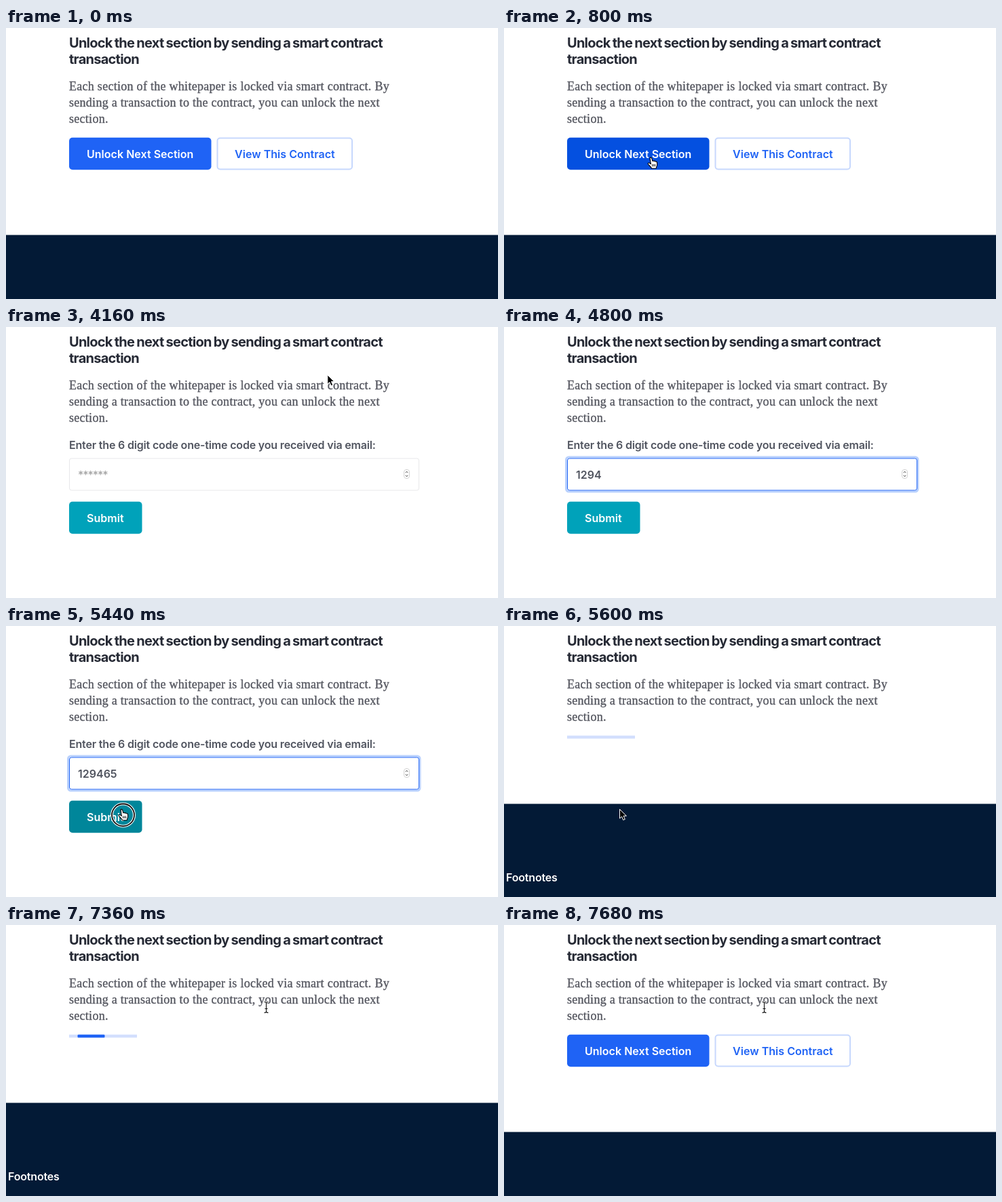
An HTML page for the animation above (8000 ms loop, 725 by 400 pixels).

```html
<!DOCTYPE html>
<html lang="en">
<head>
<meta charset="utf-8">
<title>Unlock section</title>
<style>
  html, body { margin: 0; width: 100%; height: 100%; overflow: hidden; background: #fff; }
  svg { display: block; width: 100%; height: 100%; }
  text { font: 600 16px Inter, sans-serif; letter-spacing: -.011em; white-space: pre; }
  .title { font-size: 20px; font-weight: 700; letter-spacing: -.75px; word-spacing: -.9px; fill: #262a35; }
  .copy { font: 18px "Liberation Serif", serif; letter-spacing: .28px; fill: #54565f; stroke: #54565f; stroke-width: .35; }
  .label { fill: #50545f; }
  .button { letter-spacing: .03px; fill: #fff; }
  .typed { letter-spacing: 0; fill: #50545f; }
  .empty { font-weight: 500; letter-spacing: -1.1px; fill: #a3a3a3; }
</style>
</head>
<body>
<svg viewBox="0 0 725 400" preserveAspectRatio="xMinYMin meet">
  <defs><clipPath id="track"><rect x="93" y="161.5" width="100" height="5"/></clipPath></defs>
  <rect width="725" height="400" fill="#fff"/>
  <text class="title" x="93" y="29">Unlock the next section by sending a smart contract</text>
  <text class="title" x="93" y="53">transaction</text>
  <text class="copy" x="93" y="92">Each section of the whitepaper is locked via smart contract. By</text>
  <text class="copy" x="93" y="116">sending a transaction to the contract, you can unlock the next</text>
  <text class="copy" x="93" y="140">section.</text>

  <g id="footer">
    <rect width="725" height="400" fill="#031a36"/>
    <text x="3" y="114" fill="#fff">Footnotes</text>
  </g>

  <g id="actions">
    <rect id="unlock" x="93" y="161.7" width="209.5" height="47.6" rx="5"/>
    <text class="button" x="119" y="191.5">Unlock Next Section</text>
    <rect x="311.5" y="162.5" width="198.5" height="46" rx="4" fill="#fff" stroke="#c7d8fd" stroke-width="2"/>
    <text class="button" x="337" y="191.5" style="fill:#1f63f5">View This Contract</text>
  </g>

  <g id="form">
    <text class="label" x="93" y="179.5">Enter the 6 digit code one-time code you received via email:</text>
    <rect id="glow" x="91.5" y="192" width="518.5" height="51" rx="4" fill="none" stroke="#b9d1fd" stroke-width="3"/>
    <rect id="field" x="93.5" y="194" width="515" height="47" rx="3" fill="#fff"/>
    <text id="code" x="106" y="223.5"></text>
    <rect x="586.5" y="210.5" width="8" height="13" rx="3.5" fill="#fff" stroke="#d2d2d2"/>
    <path d="M588.7 215.2l1.8-2 1.8 2M588.7 218.8l1.8 2 1.8-2" fill="none" stroke="#444"/>
    <rect id="submit" x="93" y="257.7" width="107.5" height="47.6" rx="5"/>
    <text class="button" x="119" y="287.5">Submit</text>
  </g>

  <g id="loader" clip-path="url(#track)">
    <rect x="93" y="161.5" width="100" height="5" fill="#d3dffd"/>
    <rect id="bar" y="161.5" width="40" height="5" rx="1.5" fill="#1f63f5"/>
  </g>

  <g id="pointer">
    <g id="ring" fill="none">
      <circle cx="2.5" cy="8.5" r="16.5" stroke="#fff" stroke-width="4"/>
      <circle cx="2.5" cy="8.5" r="16.5" stroke="#111" stroke-width="1.8"/>
    </g>
    <path id="arrow" d="M.5 .5V14l3.1-2.8 2.1 5.2 2.6-1.1-2.2-5h4.3z" fill="#000" stroke="#fff"/>
    <g id="hand">
      <path d="M-1 1.2C-.6-.3 1.3-.2 1.7 1.3L2.8 5.4C3.5 4.7 4.8 4.8 5.2 5.7 6 5.1 7.2 5.4 7.5 6.3 8.6 5.9 9.6 6.7 9.6 8V11C9.6 12.6 8.5 13.6 8.2 16.3H1.6C.8 14.2-1.2 12.6-3.5 10.2-4.7 8.7-3 7.4-1.5 8.5L.4 9.8z" fill="#fff" stroke="#000" stroke-width="1.1" stroke-linejoin="round"/>
      <path d="M2.6 10v3.4M4.6 10v3.4M6.6 10v3.4" stroke="#000" stroke-width=".9"/>
    </g>
    <g id="beam" fill="none">
      <path d="M-3-8Q0-8 0-6Q0-8 3-8M0-6V6M-3 8Q0 8 0 6Q0 8 3 8M-2 2H2" stroke="#fff" stroke-width="2.4"/>
      <path d="M-3-8Q0-8 0-6Q0-8 3-8M0-6V6M-3 8Q0 8 0 6Q0 8 3 8M-2 2H2" stroke="#111" stroke-width="1.1"/>
    </g>
  </g>
</svg>
<script>
const LOOP = 8000, STEP = 160;
const $ = id => document.getElementById(id);
const show = (id, on) => $(id).style.display = on ? '' : 'none';
const fill = (id, color) => $(id).setAttribute('fill', color);
const within = (t, from, to) => t >= from && t < to;

// Pointer stops: time, x, y, shape; an empty shape hides it.
const stops = [
  [0, 300, 390, ''],
  [160, 300, 352, 'arrow'],
  [480, 244, 236, 'arrow'],
  [640, 221, 202, 'hand'],
  [800, 216, 191, 'hand'],
  [960, 216, 191, 'hand'],
  [1120, 276, 169, 'arrow'],
  [1280, 276, 169, ''],
  [4160, 473.3, 70.3, 'arrow'],
  [4320, 430, 150, 'arrow'],
  [4480, 396, 216, 'beam'],
  [4640, 396, 216, ''],
  [5120, 182, 276, 'hand'],
  [5280, 170, 271, 'hand'],
  [5600, 170, 270, 'arrow'],
  [6560, 170, 270, 'arrow'],
  [7200, 350, 142, 'beam'],
  [7360, 383.5, 121.5, 'beam'],
  [LOOP, 383.5, 121.5, '']
];

function movePointer(t) {
  const i = stops.findIndex(s => s[0] > t);
  const [t0, x0, y0, shape] = stops[i - 1], [t1, x1, y1] = stops[i];
  const k = (t - t0) / (t1 - t0);
  $('pointer').setAttribute('transform', `translate(${x0 + (x1 - x0) * k} ${y0 + (y1 - y0) * k})`);
  for (const id of ['arrow', 'hand', 'beam']) show(id, id === shape);
  show('ring', within(t, 960, 1120) || within(t, 4480, 4640) || within(t, 5440, 5600));
}

function draw(now) {
  const t = Math.floor(now % LOOP / STEP) * STEP;
  const form = within(t, 1120, 5600), loading = within(t, 5600, 7680);
  show('form', form);
  show('loader', loading);
  show('actions', !form && !loading);
  $('footer').setAttribute('transform', `translate(0 ${form ? 401.5 : loading ? 262.5 : 305.5})`);

  fill('unlock', within(t, 640, 1120) ? '#0450e0' : '#1f63f5');
  fill('submit', t >= 5120 ? '#00869a' : '#00a2ba');

  const focus = t >= 4480;
  const typed = '129465'.slice(0, Math.max(0, Math.floor((t - 4480) / 80)));
  show('glow', focus);
  $('field').setAttribute('stroke', focus ? '#1f63f5' : '#e8e8ea');
  $('code').textContent = typed || '******';
  $('code').setAttribute('class', typed ? 'typed' : 'empty');

  const phase = ((t - 5600) / 1280 + 1) % 1;
  $('bar').setAttribute('x', 53 + 140 * phase);

  movePointer(t);
}

const start = performance.now();
function tick() {
  draw(performance.now() - start);
  requestAnimationFrame(tick);
}
tick();
</script>
</body>
</html>
```
